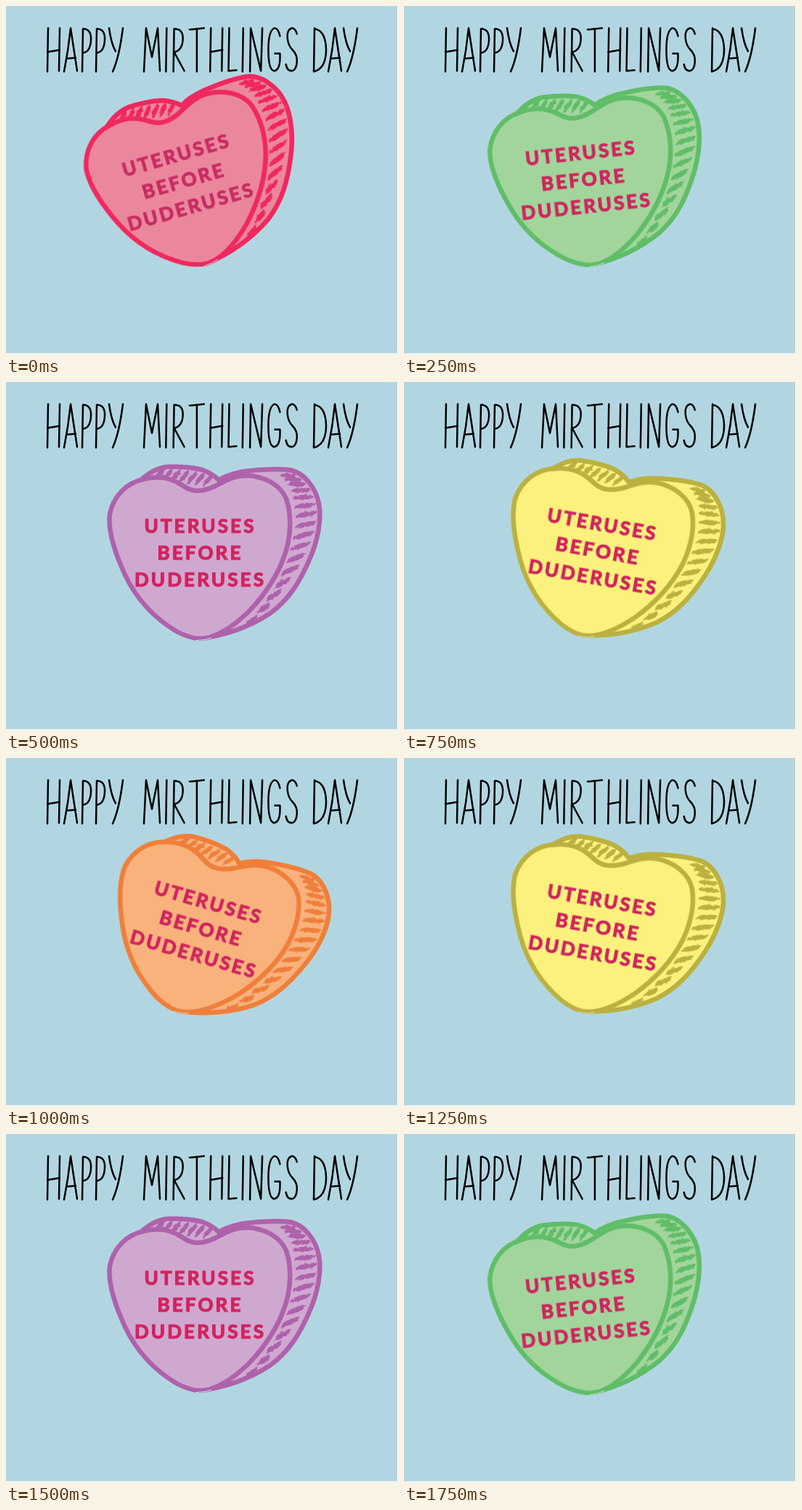
Animation, 540 px wide and 480 px high, one loop 2 s. Source, as an HTML page:

```html
<!DOCTYPE html>
<html lang="en">
<head>
<meta charset="utf-8">
<title>Candy heart</title>
<style>
  html, body { margin: 0; width: 100%; height: 100%; overflow: hidden; background: #fff; }
  svg { display: block; width: 540px; height: 480px; }
  .shell { fill: var(--fill); stroke: var(--line); stroke-width: 6.5; stroke-linejoin: round; }
  #hatch { fill: var(--line); }
  #title { fill: none; stroke: #000; stroke-width: 2.5; stroke-linecap: round; stroke-linejoin: round; }
  text {
    font: 700 26px Lato, "Open Sans", sans-serif; letter-spacing: 3.1px; text-anchor: middle;
    fill: var(--ink); stroke: var(--ink); stroke-width: 1.2;
  }
</style>
</head>
<body>
<svg viewBox="0 0 540 480">
  <filter id="chalk">
    <feTurbulence type="fractalNoise" baseFrequency=".2" numOctaves="2" seed="4"/>
    <feDisplacementMap in="SourceGraphic" scale="4" xChannelSelector="R" yChannelSelector="G"/>
  </filter>
  <rect width="539" height="479" fill="#b2d6e1"/>
  <g id="title" role="img"></g>
  <g id="heart">
    <path class="shell" d="M185 136Q203 119 222 117Q250 116 270 121Q284 126 293 135Q312 124 340 122Q368 119 388 121C410 123 427 146 431 168C435 188 430 218 418 245C405 275 390 300 364 319C335 338 300 350 266 354Z"/>
    <g id="hatch" filter="url(#chalk)"></g>
    <path class="shell" d="M265 150C252 151 244 142 233 137C218 130 205 130 190 134C165 139 148 158 143 182C140 206 152 240 164 266C182 304 208 328 235 344Q252 353 266 354C288 354 310 340 334 317C360 290 377 262 386 232C393 206 393 182 386 161C377 140 354 130 332 129C312 129 300 138 287 144Q277 149 265 150Z"/>
    <path d="M262 356.500Q274 356.500 283 353" fill="none" stroke="#d9e9ee"/>
    <text x="267.500" y="207.500">UTERUSES</text>
    <text x="267.500" y="244.500">BEFORE</text>
    <text x="267.500" y="281.500">DUDERUSES</text>
  </g>
</svg>
<script>
const $ = id => document.getElementById(id);

// Hand lettering: [width, strokes] on a 60 px tall line
const glyphs = {
  A: [18, 'M0 60Q6 30 9 0Q14 32 18 59M3 42L16 41'],
  D: [18, 'M2 0L1 60Q18 56 18 29Q17 3 2 1'],
  G: [18, 'M17 11Q15 0 9 0Q1 4 1 30Q1 58 9 59Q18 58 17 35L10 35'],
  H: [18, 'M2 0L1 60M18 0L17 59M1 33L18 30'],
  I: [3, 'M2 0L1 60'],
  L: [12, 'M2 0L1 59L12 58'],
  M: [22, 'M0 60L3 0L11 40L19 0L22 59'],
  N: [18, 'M1 60L2 0L16 59L18 0'],
  P: [13, 'M1 60L2 1Q14 1 13 17Q12 33 2 34'],
  R: [16, 'M1 60L2 1Q15 1 14 16Q13 31 2 33L16 59'],
  S: [16, 'M15 8Q13 0 8 0Q1 2 2 14Q3 24 9 30Q16 37 15 47Q14 59 7 59Q1 58 0 50'],
  T: [20, 'M0 2L20 0M10 1L10 60'],
  Y: [19, 'M0 0Q3 22 9 32M19 0Q14 40 5 60']
};

function letter(word, x, gap) {
  return [...word].map(c => {
    const [width, d] = glyphs[c];
    const path = `<path transform="translate(${x} 30.5)" d="${d}"/>`;
    x += width + gap;
    return path;
  }).join('');
}

$('title').innerHTML = letter('HAPPY', 56, 6) + letter('MIRTHLINGS', 190, 7.3) + letter('DAY', 423, 3);
$('title').setAttribute('aria-label', 'HAPPY MIRTHLINGS DAY');

// A chalky crescent, arched upwards
const mark = (x, y, len, thick, angle) =>
  `<path transform="translate(${x} ${y}) rotate(${angle})"
    d="M${-len / 2} 3Q${-len / 3} ${-thick} ${len / 2} ${-thick / 2}Q${len / 3} ${thick} ${-len / 2} 3Z"/>`;

const bezier = (t, a, b, c, d) =>
  (1 - t) ** 3 * a + 3 * t * (1 - t) ** 2 * b + 3 * t * t * (1 - t) * c + t ** 3 * d;

let marks = '';
for (let i = 0; i < 16; i++) {
  const t = i / 15;
  marks += mark(bezier(t, 388, 427, 428, 338), bezier(t, 129, 150, 240, 330),
    22 + 10 * Math.sin(Math.PI * t), 6, 14 - 46 * t);
}
for (let i = 0; i < 7; i++) marks += mark(212 + 11 * i, 126 + 1.5 * i, 22, 5, -42);
$('hatch').innerHTML = marks;

const poses = [
  { x: 243, y: 240, angle: -16, fill: '#eb879c', line: '#f0285f', ink: '#c72c62' },
  { x: 246, y: 238, angle: -6, fill: '#a2d59c', line: '#60bd68', ink: '#d0245f' },
  { x: 266, y: 234, angle: 0, fill: '#cfa8d0', line: '#ae62ab', ink: '#d0245f' },
  { x: 266, y: 231, angle: 10, fill: '#fbf17c', line: '#bab141', ink: '#d0245f' },
  { x: 268, y: 233, angle: 16, fill: '#f9b27c', line: '#ef7f3a', ink: '#d0245f' }
];
const heart = $('heart');

function draw(now) {
  const step = Math.floor(now / 250) % 8;
  const pose = poses[Math.min(step, 8 - step)]; // swing there and back
  heart.setAttribute('transform', `translate(${pose.x} ${pose.y}) rotate(${pose.angle}) translate(-266 -234)`);
  for (const key of ['fill', 'line', 'ink']) heart.style.setProperty('--' + key, pose[key]);
  requestAnimationFrame(draw);
}
draw(performance.now());
</script>
</body>
</html>
```
